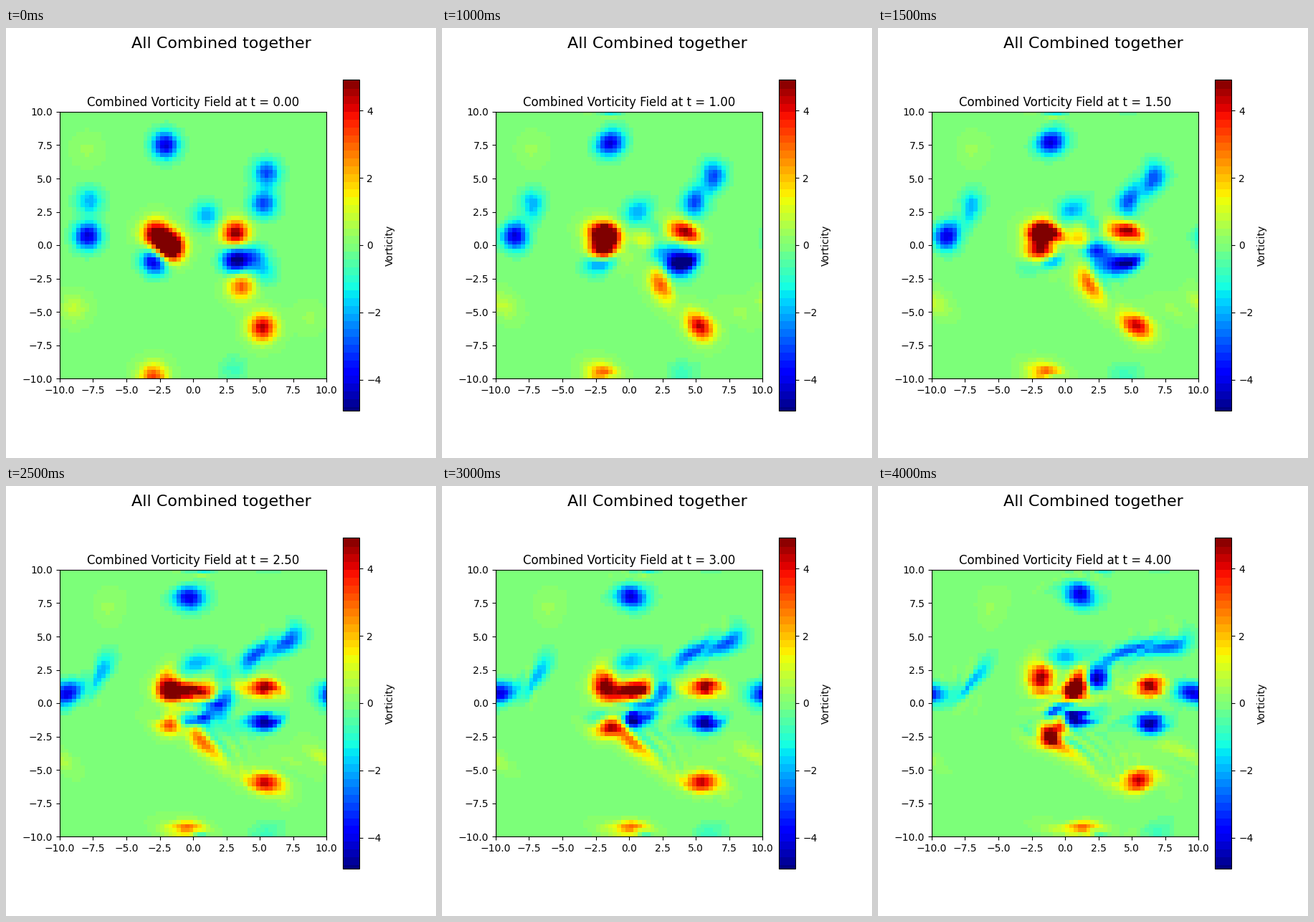
Animation of 600x600 px, one loop 4.5 s. Source, as a matplotlib script:

```python
import numpy as np
import matplotlib.pyplot as plt
from matplotlib.animation import FuncAnimation
from matplotlib.colors import ListedColormap

N, L, NU = 64, 20.0, 0.001
DX = L / N
STEP, FRAMES, SUB = 0.5, 9, 20
AMP = 5.0
VMAX = AMP * np.exp(-1 / 64)

# Periodic grid; y runs down the picture.
axis = -L / 2 + DX * np.arange(N)
X, Y = np.meshgrid(axis, axis)
kx = 2 * np.pi * np.fft.rfftfreq(N, DX)
ky = 2 * np.pi * np.fft.fftfreq(N, DX)
K2 = kx**2 + ky[:, None]**2
K2[0, 0] = np.inf


def vortex(x, y, strength=AMP):
    return strength * np.exp(-(X - x)**2 - (Y - y)**2)


same = vortex(-2, 0) + vortex(2, 0)
opposite = vortex(-2, 0) - vortex(2, 0)
pairs = sum(vortex(x, -1) - vortex(x, 1) for x in (-3, 3))

# Scattered vortices: strength and the places that share it.
SCATTER = {
    -4.25: [(-2.26, -7.62), (-8.06, -0.81)],
    -3.1: [(5.32, -5.53), (5.1, -3.23)],
    -2.05: [(-7.92, -3.45), (0.81, -2.36), (4.35, 0.75)],
    -1.35: [(5.15, 1.85)],
    -0.75: [(2.84, 9.14)],
    0.33: [(-8.09, -7.3), (8.54, 5.3)],
    0.8: [(-9.1, 4.6)],
    3.3: [(3.44, 2.9), (-3.16, 9.75)],
    4.5: [(5.02, 6.02)],
}
scattered = sum(vortex(x, y, a) for a, spots in SCATTER.items()
                for x, y in spots)


def ddx(f):
    return (np.roll(f, -1, -1) - np.roll(f, 1, -1)) / (2 * DX)


def ddy(f):
    return (np.roll(f, -1, -2) - np.roll(f, 1, -2)) / (2 * DX)


def laplacian(f):
    near = sum(np.roll(f, s, ax) for s in (1, -1) for ax in (-1, -2))
    return (near - 4 * f) / DX**2


def rate(w):
    psi = np.fft.irfft2(-np.fft.rfft2(w) / K2, s=(N, N))
    return ddx(psi) * ddy(w) - ddy(psi) * ddx(w) + NU * laplacian(w)


def advance(w, dt):
    a = rate(w)
    b = rate(w + dt / 2 * a)
    c = rate(w + dt / 2 * b)
    d = rate(w + dt * c)
    return w + dt / 6 * (a + 2 * b + 2 * c + d)


# Each case evolves on its own; the picture is their sum.
state = np.array([same, opposite, pairs, scattered])
fields = [state.sum(0)]
for _ in range(FRAMES - 1):
    for _ in range(SUB):
        state = advance(state, STEP / SUB)
    fields.append(state.sum(0))

# Jet in narrow bands, with the zero band in its middle green.
idx = np.arange(256)
band = np.clip((idx - 129) // 6 * 6 + 132, 0, 255)
band[123:129] = 128
cmap = ListedColormap(plt.get_cmap("jet")(band))

fig, ax = plt.subplots(figsize=(6, 6), dpi=100)
fig.suptitle("All Combined together", fontsize=16)
im = ax.imshow(fields[0], cmap=cmap, vmin=-VMAX, vmax=VMAX,
               extent=(-10, 10, -10, 10), interpolation="nearest")
fig.colorbar(im, ax=ax, label="Vorticity")
title = ax.set_title("")


def draw(i):
    im.set_data(fields[i])
    title.set_text(f"Combined Vorticity Field at t = {i * STEP:.2f}")
    return im, title


anim = FuncAnimation(fig, draw, frames=FRAMES, interval=500, repeat=True)
plt.show()
```
